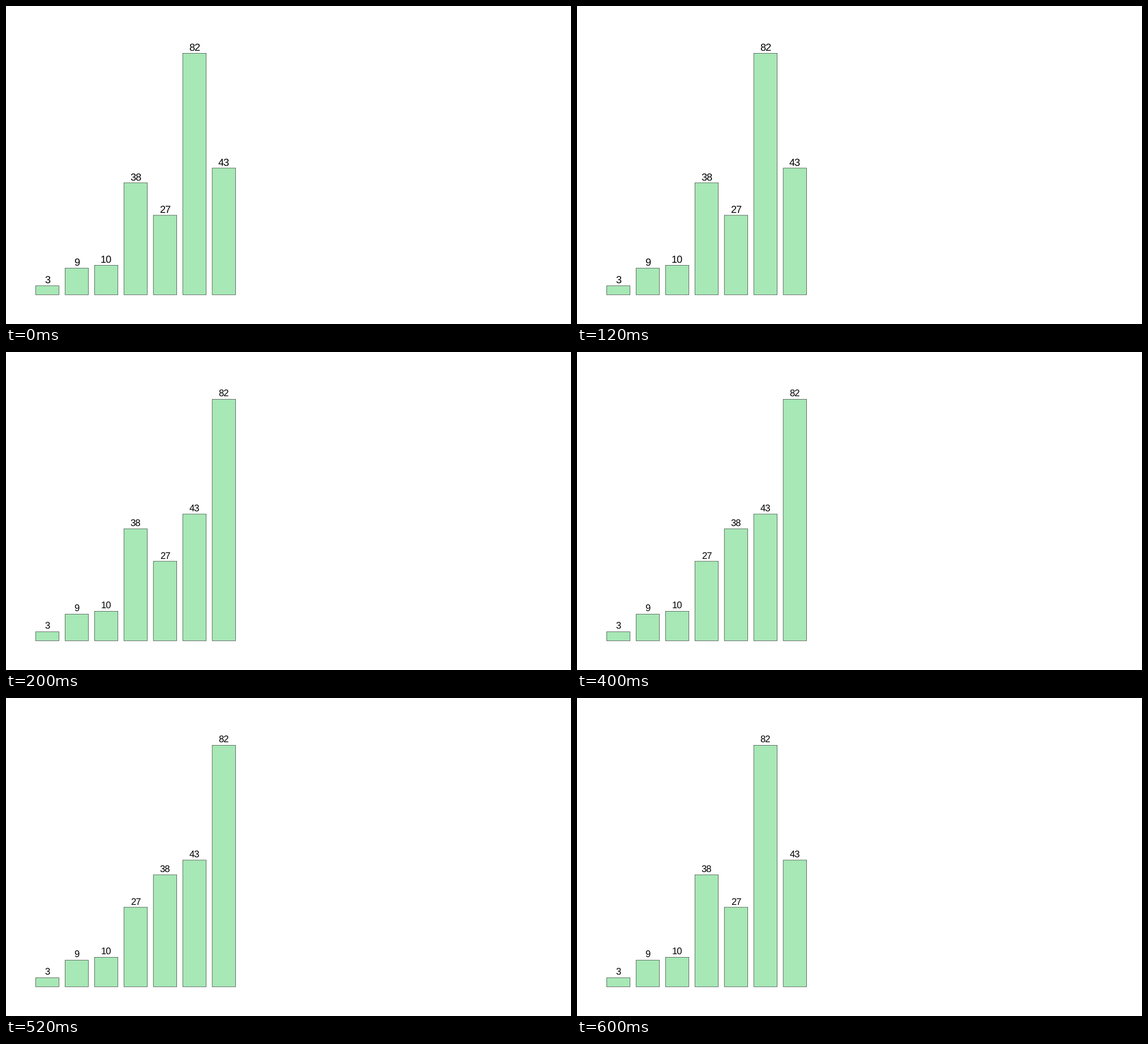
Recreate the animation shown at these times as a matplotlib script. Size 998 by 561 pixels, loop 0.8 s.

```python
import matplotlib.pyplot as plt
from matplotlib.animation import FuncAnimation
from matplotlib.patches import Rectangle

WIDTH, HEIGHT, DPI = 998, 561, 64
SLIDE_W, SLIDE_H = 1920, 1080          # layout units
BASE, LEFT, PITCH, BAR_WIDTH, UNIT = 980, 100, 100, 80, 10
LABEL_GAP = 8
FILL, EDGE = "#a7e8b6", "black"

VALUES = [3, 9, 10, 38, 27, 82, 43]
SWAPS = [(5, 6), (3, 4)]               # exchanges that finish the sort
STEPS = 4

plt.rcParams["text.hinting"] = "none"


def points(units):
    """Convert a length in layout units to typographic points."""
    return units * WIDTH / SLIDE_W * 72 / DPI


def order_at(step):
    values = VALUES.copy()
    for i, j in SWAPS[:step % (STEPS - 1)]:
        values[i], values[j] = values[j], values[i]
    return values


fig = plt.figure(figsize=(WIDTH / DPI, HEIGHT / DPI), dpi=DPI, facecolor="white")
ax = fig.add_axes([0, 0, 1, 1])
ax.set(xlim=(0, SLIDE_W), ylim=(SLIDE_H, 0))
ax.axis("off")

bars, labels = [], []
for slot in range(len(VALUES)):
    x = LEFT + slot * PITCH + 0.5
    bars.append(ax.add_patch(Rectangle((x, BASE + 0.5), BAR_WIDTH, 0, facecolor=FILL,
                                       edgecolor=EDGE, linewidth=points(1),
                                       snap=False)))
    labels.append(ax.text(x + BAR_WIDTH / 2, 0, "", ha="center", va="baseline",
                          family="Liberation Sans", color="black"))


def draw(step):
    label_size = points(35 if step == 0 else 32)
    for bar, label, value in zip(bars, labels, order_at(step)):
        bar.set_height(-value * UNIT)
        label.set_text(str(value))
        label.set_y(BASE - value * UNIT - LABEL_GAP)
        label.set_fontsize(label_size)
    return bars + labels


anim = FuncAnimation(fig, draw, frames=STEPS, interval=200, repeat=True,
                     repeat_delay=0, blit=False)
plt.show()
```
